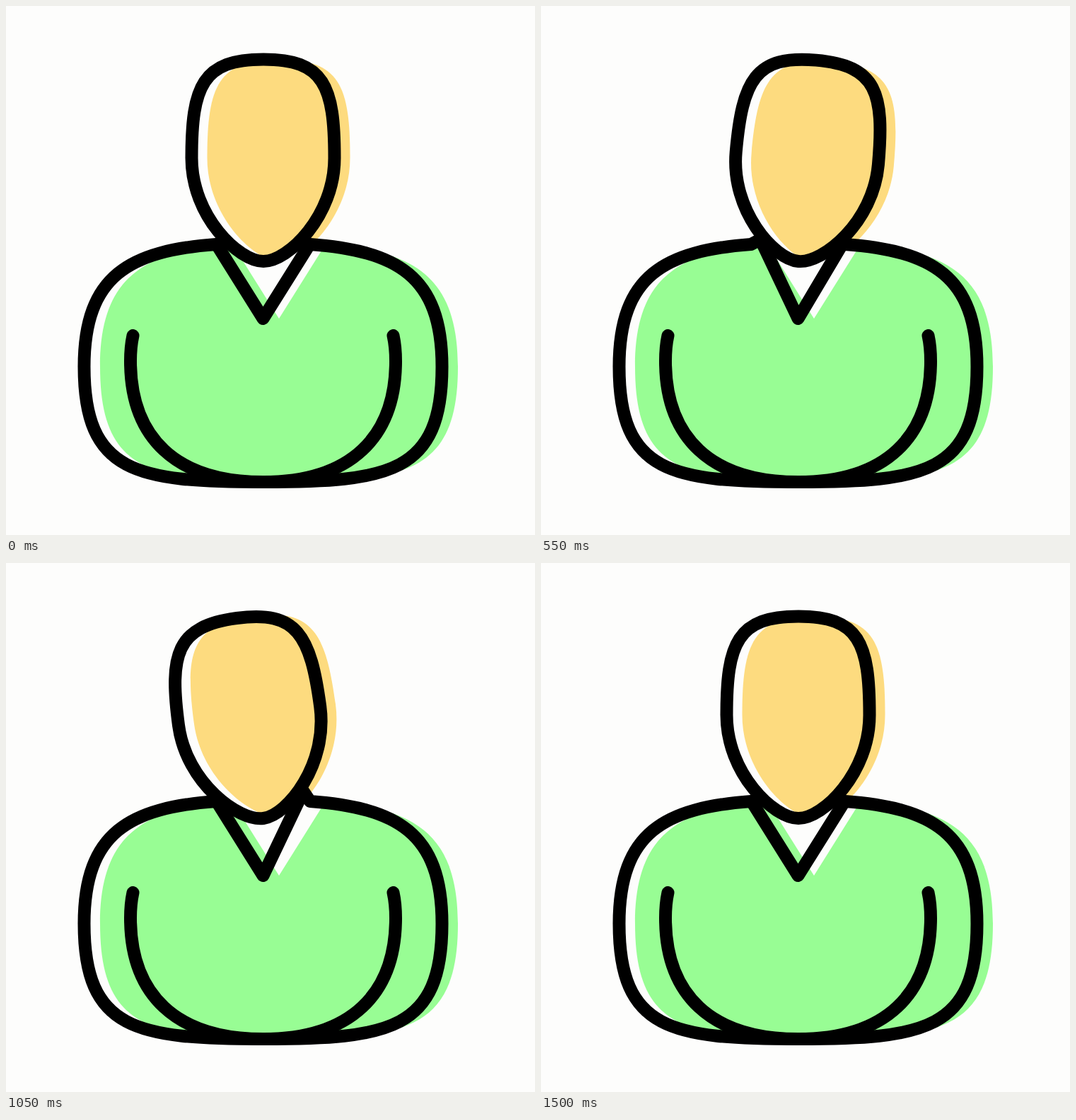
An HTML page that plays this animation: 748x748 px, repeating every 1550 ms.

```html
<!DOCTYPE html>
<html lang="en">
<head>
<meta charset="utf-8">
<title>Head tilt</title>
<style>
  html, body { margin: 0; width: 100%; height: 100%; overflow: hidden; background: #fdfdfc; }
  svg { display: block; width: 100%; height: 100%; }
  .line { fill: none; stroke: #000; stroke-width: 18; stroke-linecap: round; stroke-linejoin: round; }
</style>
</head>
<body>
<svg viewBox="0 0 748 748">
  <defs>
    <path id="skull" d="M262.5 215C262.5 113 278 75.5 364 75.5S464.5 113 464.5 215C464.5 297 399 361 364 361S262.5 297 262.5 215Z"/>
    <path id="arm" d="M179.5 466Q176 482 176 502C176 610 240 673 363.5 673"/>
    <clipPath id="aboveCollar">
      <use href="#skull"/>
      <rect width="748" height="335"/>
    </clipPath>
  </defs>
  <path id="shirt" fill="#98fd94" transform="translate(22.5)"/>
  <g id="head">
    <g clip-path="url(#aboveCollar)">
      <use href="#skull" x="22" fill="#fddb7f"/>
    </g>
    <use href="#skull" class="line"/>
  </g>
  <g class="line">
    <path id="body"/>
    <use href="#arm"/>
    <use href="#arm" transform="matrix(-1 0 0 1 727 0)"/>
  </g>
</svg>
<script>
  const LOOP = 1550, STEP = 50, TILT = 8;
  const byId = id => document.getElementById(id);
  const head = byId('head'), body = byId('body');

  const ease = (t, from, to) => {
    const p = Math.min(1, Math.max(0, (t - from) / (to - from)));
    return p * p * (3 - 2 * p);
  };

  // left and right: how far each collar corner is pulled in, 0 to 1
  const torso = (left, right) =>
    `M297 337C176 346 110.5 380 110.5 510C110.5 661 185 673 363.5 673` +
    `S616.5 661 616.5 510C616.5 380 551 346 430 337` +
    `L${428 - 8 * right} ${339 - 17 * right}L363.5 442` +
    `L${299 + 14 * left} ${339 - 11 * left}Z`;

  function draw(now) {
    const t = Math.floor(now % LOOP / STEP) * STEP;
    const toRight = ease(t, 0, 400);
    const toLeft = ease(t, 400, 945);
    const toRest = ease(t, 1000, 1380);
    head.setAttribute('transform', `rotate(${TILT * (toRight - 2 * toLeft + toRest)} 364 361)`);
    body.setAttribute('d', torso(toRight - toLeft, toLeft - toRest));
    requestAnimationFrame(draw);
  }

  byId('shirt').setAttribute('d', torso(0, 0));
  draw(performance.now());
</script>
</body>
</html>
```
